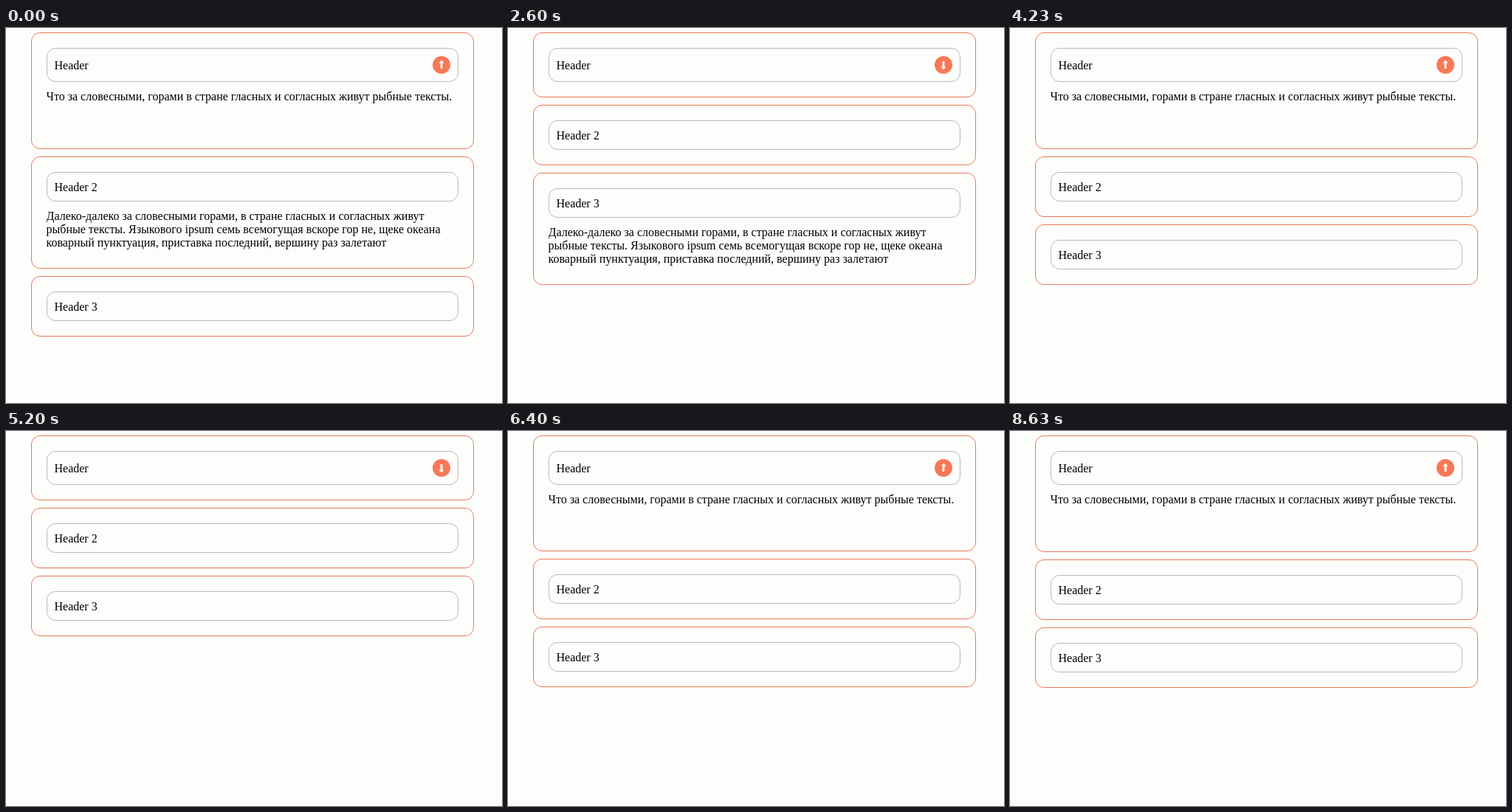
Write an HTML page that moves like this. It is 672 px wide and 508 px high and loops after 8.66 s.

```html
<!DOCTYPE html>
<html lang="ru">
<head>
<meta charset="utf-8">
<title>Accordion</title>
<style>
  html, body { margin: 0; width: 100%; height: 100%; overflow: hidden; background: #fdfdfc; }
  body { font: 16px/18px "Liberation Serif", "Times New Roman", serif; color: #000; }
  main { position: absolute; left: 34px; top: 6px; width: 600px; }
  section { box-sizing: border-box; margin-bottom: 10px; padding: 20px; border: 1px solid #e67a58; border-radius: 12px; }
  header { display: flex; align-items: center; justify-content: space-between; padding: 10px; border: 1px solid #b9b9b4; border-radius: 12px; }
  .body { overflow: hidden; height: 0; white-space: nowrap; }
  p { margin: 10px 0 0; }
  span, p { position: relative; left: -.5px; top: 1px; }
  svg { display: block; width: 24px; height: 24px; }
</style>
</head>
<body>
<main>
  <section>
    <header>
      <span>Header</span>
      <svg viewBox="-12 -12 24 24">
        <circle r="12" fill="#f77856"/>
        <path id="arrow" d="M0 -6.5L3.6 -2.6H1.4V5H-1.4V-2.6H-3.6Z" fill="#fdfdfc"/>
      </svg>
    </header>
    <div class="body"><p>Что за словесными, горами в стране гласных и согласных живут рыбные тексты.</p></div>
  </section>
  <section>
    <header><span>Header 2</span></header>
    <div class="body"><p>Далеко-далеко за словесными горами, в стране гласных и согласных живут<br>рыбные тексты. Языкового ipsum семь всемогущая вскоре гор не, щеке океана<br>коварный пунктуация, приставка последний, вершину раз залетают</p></div>
  </section>
  <section>
    <header><span>Header 3</span></header>
    <div class="body"><p>Далеко-далеко за словесными горами, в стране гласных и согласных живут<br>рыбные тексты. Языкового ipsum семь всемогущая вскоре гор не, щеке океана<br>коварный пунктуация, приставка последний, вершину раз залетают</p></div>
  </section>
</main>
<script>
  const LOOP = 8660, SLIDE = 280, FULL = 70;

  // Initial state of each panel and the times at which it is toggled.
  const panels = [
    { open: 1, toggles: [830, 3920, 4530, 5900, 6375, 7670] },
    { open: 1, toggles: [1170, 2900, 3600, 5270, 6090] },
    { open: 0, toggles: [1570, 2600] }
  ];
  const bodies = document.querySelectorAll('.body');
  const arrow = document.getElementById('arrow');

  const ease = x => (1 - Math.cos(Math.PI * Math.min(1, Math.max(0, x)))) / 2;

  function openness({ open, toggles }, t) {
    let value = open, sign = open ? -1 : 1;
    for (const start of toggles) {
      value += sign * ease((t - start) / SLIDE);
      sign = -sign;
    }
    return value;
  }

  function draw(t) {
    panels.forEach((panel, i) => {
      const value = openness(panel, t);
      bodies[i].style.height = Math.round(FULL * value) + 'px';
      if (i === 0) arrow.setAttribute('transform', `rotate(${180 * (1 - value)})`);
    });
  }

  const begin = performance.now();
  function tick() {
    draw((performance.now() - begin) % LOOP);
    requestAnimationFrame(tick);
  }
  tick();
</script>
</body>
</html>
```
